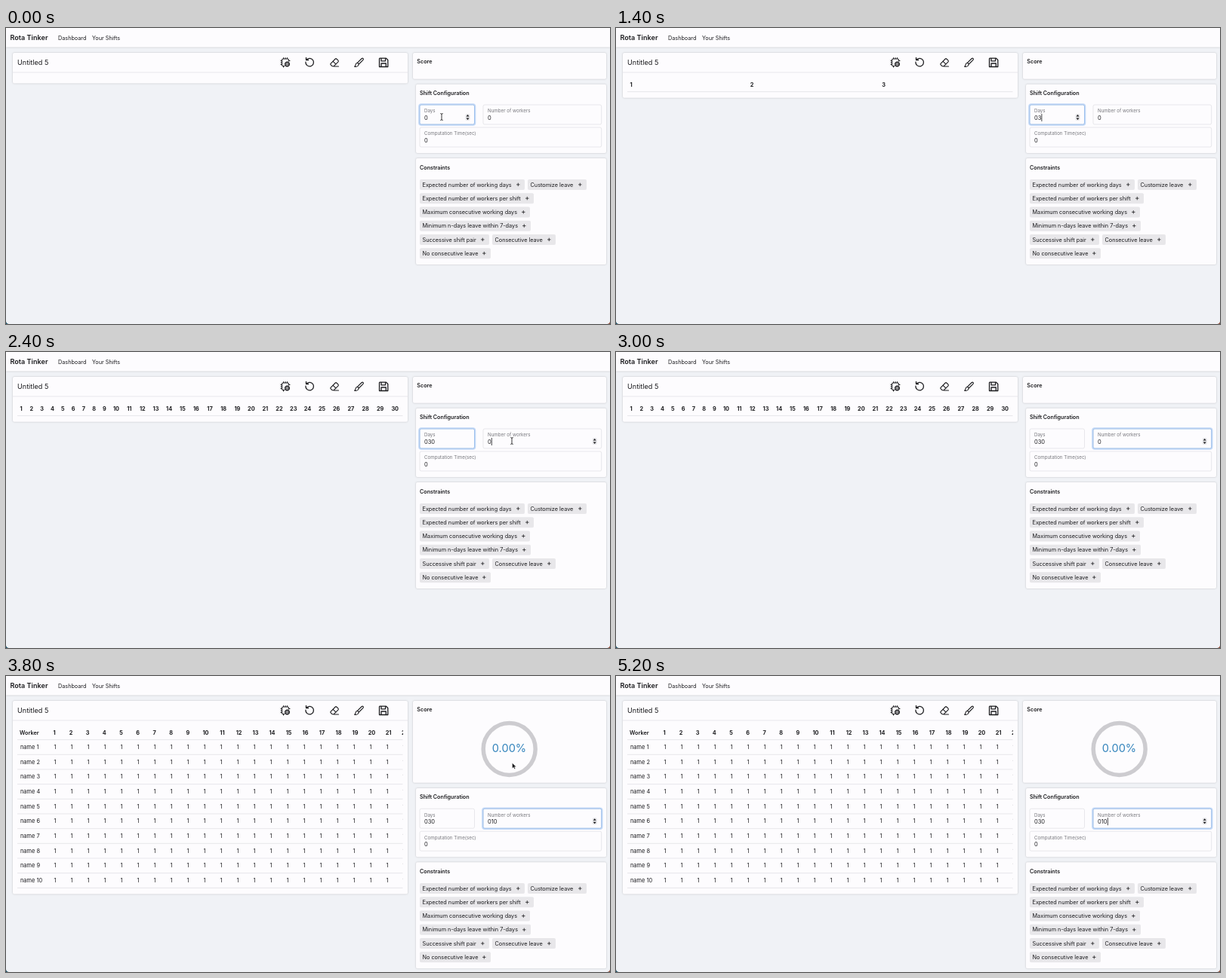
An HTML page that plays this animation: 800 by 393 pixels, repeating every 5.6 s.

```html
<!DOCTYPE html>
<html lang="en">
<head>
<meta charset="utf-8">
<title>Rota Tinker</title>
<style>
  html, body { margin: 0; width: 100%; height: 100%; overflow: hidden; background: #f0f2f6; }
  svg { display: block; font-family: Inter, sans-serif; fill: #1c1c1f; }
  .card { fill: #fdfcfe; filter: drop-shadow(0 0 1.3px #0003); }
  .bold { font-weight: 600; }
  .heavy { font-weight: 700; }
  .mid { text-anchor: middle; }
  .label { fill: #77777c; }
  .rule { stroke: #dedee2; stroke-width: .7; }
  .icon { fill: none; stroke: #1c1c1f; stroke-width: 1.1; stroke-linejoin: round; stroke-linecap: round; }
</style>
</head>
<body>
<svg id="stage" width="800" height="393" viewBox="0 0 800 393"></svg>
<script>
const LOOP = 5600, STEP = 100;
const stage = document.getElementById('stage');
const clamp = v => Math.max(0, Math.min(1, v));
const range = (n, f) => Array.from({ length: n }, (_, i) => f(i)).join('');

const text = (x, y, s, size = 7.3, cls = '') =>
  `<text x="${x}" y="${y}" font-size="${size}" class="${cls}">${s}</text>`;
const card = (x, y, right, bottom) =>
  `<rect class="card" x="${x}" y="${y}" width="${right - x}" height="${bottom - y}" rx="2"/>`;
const rule = (x, y, right) => `<path class="rule" d="M${x} ${y}H${right}"/>`;

const icons = `<g class="icon">
  <path d="M374.5 44V42.500a1.500 1.500 0 0 0-1.500-1.500h-6a1.500 1.500 0 0 0-1.500 1.500v6.500a1.500 1.500 0 0 0 1.500 1.500h2
    M367.500 41v-1.500m2.500 1.500v-1.500m2.500 1.500v-1.500M365.500 43.500h-1.500m1.500 2.500h-1.500m1.500 2.500h-1.500m3.500 2v1.500M374.500 43.500h1.500"/>
  <circle cx="372.500" cy="48" r="2.800" stroke-width="1.500" stroke-dasharray="1.500 .7"/>
  <circle cx="372.500" cy="48" r="1.200" stroke-width=".8"/>
  <path stroke-width="1.300" d="M398.300 42a5.300 5.300 0 1 1-1.400 3.200M397.500 39.500v3h3"/>
  <path d="M430 47.300l6.200-6.300q.8-.8 1.600 0l2.200 2.200q.8.800 0 1.600l-6 6h-1.800l-2.200-2.200q-.6-.6 0-1.300zM433 44.200l4 4M434 51h6.500"/>
  <path d="M465.500 46.200l5.700-5.700q1-.8 1.800 0t0 1.800l-5.700 5.700zM465.500 46.200q-2 .2-2.400 2.500t-1.600 2.500q5 .8 5.800-3.200"/>
  <path stroke-width="1.300" d="M495 40.200h8.500l2.300 2.300v9h-11.300v-10.800zM497 40.500v3.300h5.500v-3.300M497 51.200v-4.200h6.300v4.200"/>
</g>`;

const chips = [
  [548, 0, 687, 'Expected number of working days'], [691, 0, 769, 'Customize leave'],
  [548, 1, 699, 'Expected number of workers per shift'],
  [548, 2, 694, 'Maximum consecutive working days'],
  [548, 3, 695, 'Minimum n-days leave within 7-days'],
  [548, 4, 640, 'Successive shift pair'], [644, 4, 728, 'Consecutive leave'],
  [548, 5, 642, 'No consecutive leave']
].map(([x, row, right, s]) => {
  const y = 207.9 + row * 18.25;
  return `<rect x="${x}" y="${y - 7}" width="${right - x}" height="14" rx="2" fill="#e8e7ea"/>` +
    text(x + 3.5, y + 2.6, s) +
    `<path d="M${right - 10.900} ${y}h4.400m-2.200-2.200v4.400" stroke="#1c1c1f" stroke-width=".8"/>`;
}).join('');

function field(x, y, right, label, value, { focus = 0, caret, spin } = {}) {
  const box = `x="${x}" y="${y}" width="${right - x}" height="26" rx="2"`;
  const end = x + 6.2 + [...value].reduce((w, c) => w + (c === '1' ? 3.4 : 4.65), 0);
  const sx = right - 9, sy = y + 16.5;
  return `<rect ${box} fill="none" stroke="#c3d9f7" stroke-width="3.600" opacity="${focus}"/>
    <rect ${box} fill="#fdfcfe" stroke="#dedee2" stroke-width=".7"/>
    <rect ${box} fill="none" stroke="#8fb9ee" stroke-width=".8" opacity="${focus}"/>` +
    text(x + 6, y + 10.4, label, 6.2, 'label') + text(x + 6, y + 19.6, value, 7.5) +
    (caret ? `<rect x="${end}" y="${y + 12}" width=".8" height="10"/>` : '') +
    (spin ? `<rect x="${sx - 3}" y="${sy - 4.5}" width="6" height="9" rx="2" fill="#e6e6e9"/>
      <path d="M${sx - 2} ${sy - 1}l2-2.500 2 2.500zM${sx - 2} ${sy + 1}l2 2.500 2-2.500z"/>` : '');
}

// Day numbers in the heading; their spacing depends on how full the table is.
function dayX(i, days, rows) {
  if (rows) return i < 9 ? 64 + 22.1 * i : 264.5 + 22 * (i - 9);
  if (days === 3) return [20, 180, 354.5][i];
  const k = i - 9;
  return i < 9 ? 20 + 13.8 * i : 146 + 17.3 * k + .058 * k * k;
}

function table(days, rows) {
  const bottom = days ? 92.8 + 19.67 * rows : 73.5;
  let out = card(9, 33, 532, bottom) + text(15, 48.8, 'Untitled 5', 9.1) + icons + rule(9, 59, 532);
  if (!days) return out;
  out += '<g clip-path="url(#table)">' + (rows ? text(18, 77.8, 'Worker', 7.3, 'bold') : '') +
    range(days, i => text(dayX(i, days, rows), 77.8, i + 1, 7.3, 'heavy mid')) + rule(15, 84.6, 525.5);
  out += range(rows, r => {
    const y = 97.1 + 19.67 * r;
    return text(19, y, 'name ' + (r + 1), 7.4) +
      range(22, i => text(65 + 22 * i, y, 1, 7.4, 'mid')) + rule(15, y + 7.2, 525.5);
  });
  return out + '</g>';
}

function pointer(t) {
  const beam = x => `<path d="M${x - 1.700} 113.500q1.700 0 1.700 1.300v6.400q0 1.300-1.700 1.300m3.400-9q-1.700 0-1.700 1.300m0 6.400q0 1.300 1.700 1.300"
    fill="none" stroke="#222" stroke-width=".9"/>`;
  if (t < 1400) return beam(577);
  if (t >= 1800 && t < 3000) {
    const p = clamp((t - 1800) / 500);
    return beam(577 + 93 * p * p * (3 - 2 * p));
  }
  if (t >= 3500 && t < 4700)
    return '<path d="M670.500 115.500l5.200 5-2.200.2 1.200 2.300-1.300.6-1.100-2.400-1.800 1.400z" stroke="#fff" stroke-width=".4"/>';
  return '';
}

// Caret blinks every 500 ms, starting lit at the last focus or key press.
const lit = (t, since) => t >= since && Math.floor((t - since) / 500) % 2 === 0;

function draw(t) {
  const days = t < 1400 ? '0' : t < 1500 ? '03' : '030';
  const workers = t < 3100 ? '0' : t < 3200 ? '01' : '010';
  const rows = +workers, drop = rows ? 74.2 : 0;
  const shift = clamp((t - 2400) / 150);
  const key = t < 1400 ? 200 : t < 1500 ? 1400 : t < 2400 ? 1500 : t < 3100 ? 2400 : t < 3200 ? 3100 : 3200;
  const caret = lit(t, key), onDays = t < 2400;

  stage.innerHTML = `<clipPath id="table"><path d="M9 60H526V393H9z"/></clipPath>
    <rect width="800" height="393" fill="#f0f2f6"/>
    <rect class="card" width="800" height="25.500"/>` +
    text(5.5, 16, 'Rota Tinker', 9.1, 'bold') +
    text(69, 15.5, 'Dashboard', 7.25, 'nav') + text(114, 15.5, 'Your Shifts', 7.25, 'nav') +
    table(+days, rows) +
    card(539, 33, 795, rows ? 141.8 : 67.8) + text(544.3, 47.4, 'Score', 7.2, 'bold') +
    (rows ? '<circle cx="666.700" cy="97" r="34.500" fill="none" stroke="#cdccd0" stroke-width="5.500"/>' +
      '<text x="666.500" y="101.400" font-size="14.600" class="mid" fill="#3585bd">0.00%</text>' : '') +
    `<g transform="translate(0 ${drop})">` +
    card(543, 74.8, 795, 166) + text(548, 89.2, 'Shift Configuration', 7.2, 'bold') +
    field(548, 102, 620.5, 'Days', days, { focus: 1 - shift, caret: onDays && caret, spin: onDays }) +
    field(632, 102, 788.7, 'Number of workers', workers,
      { focus: shift, caret: !onDays && caret, spin: t >= 2100 }) +
    field(548, 132, 788.7, 'Computation Time(sec)', '0') +
    card(543, 173, 795, 314) + text(548, 187.8, 'Constraints', 7.2, 'bold') + chips + '</g>' +
    pointer(t) +
    '<path d="M0 389.500q.5 3 3.500 3.500H0z" fill="#1d5268"/><path d="M800 389.500q-.5 3-3.500 3.500h3.500z" fill="#8c4f3e"/>';
}

let last = -1;
function tick(now) {
  const t = Math.floor(now % LOOP / STEP) * STEP;
  if (t !== last) draw(last = t);
  requestAnimationFrame(tick);
}
draw(0);
requestAnimationFrame(tick);
</script>
</body>
</html>
```
